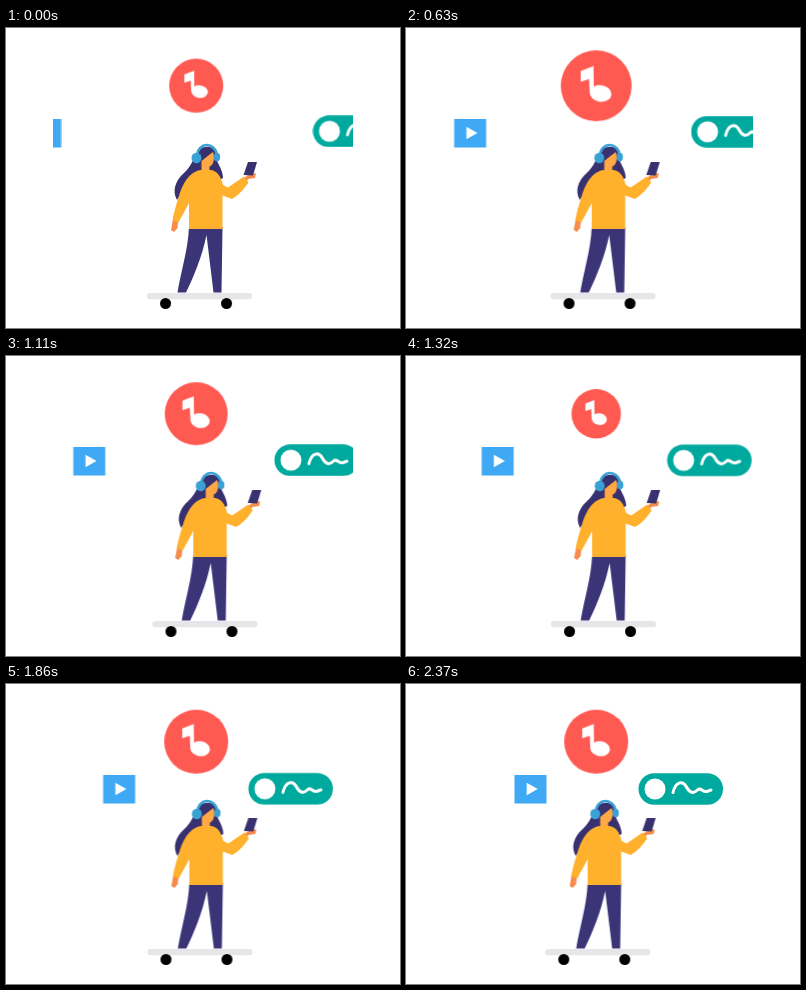
Animation, 394 px wide and 300 px high, one loop 2.67 s. Source, as an HTML page:

```html
<!DOCTYPE html>
<html lang="en">
<head>
<meta charset="utf-8">
<title>Skater with music</title>
<style>
  html, body { margin: 0; width: 100%; height: 100%; overflow: hidden; background: #fff; }
  svg { display: block; width: 100vw; height: 100vh; }
  .slide, .pulse, .sway { animation: 2670ms linear infinite; }
  .slide { animation-name: slide; }
  .pulse { animation-name: pulse; }
  .sway { animation-name: sway; }

  /* steady slide that brakes briefly at the end */
  @keyframes slide {
    0% { transform: translate(var(--x), var(--y)); }
    77.15% {
      transform: translate(calc(var(--x) * .04), calc(var(--y) * .04));
      animation-timing-function: cubic-bezier(.33, .67, .67, 1);
    }
    83.7%, 100% { transform: none; }
  }
  @keyframes pulse {
    0% { transform: scale(.845); animation-timing-function: cubic-bezier(.42, 0, .8, .8); }
    31.8% { transform: scale(1.25); animation-timing-function: cubic-bezier(.3, .1, .7, .9); }
    50% { transform: scale(.766); animation-timing-function: cubic-bezier(.3, .2, .6, 1); }
    61.4%, 100% { transform: scale(1); }
  }
  @keyframes sway {
    0% { transform: none; animation-timing-function: cubic-bezier(.4, .3, .7, .7); }
    38.4% {
      transform: translateX(calc(var(--d) * 6px));
      animation-timing-function: cubic-bezier(.4, .45, .7, .9);
    }
    88.76%, 100% { transform: translateX(calc(var(--d) * -1.7px)); }
  }
</style>
</head>
<body>
<svg viewBox="0 0 394 300">
  <clipPath id="window"><rect x="47" width="300" height="300"/></clipPath>

  <g clip-path="url(#window)">
    <g class="slide" style="--x:-85.5px;--y:0px">
      <path fill="#3fa9f5" d="M108.5 91h32v28.5h-32z"/>
      <path fill="#fff" d="M120.7 98.8l11 6.2-11 6.2z"/>
    </g>
    <g class="slide" style="--x:74.5px;--y:-1.7px">
      <rect x="232.5" y="89.2" width="84.5" height="31.6" rx="15.8" fill="#00a99d"/>
      <circle cx="249" cy="105" r="10.5" fill="#fff"/>
      <path transform="translate(232.5 89)" fill="none" stroke="#fff" stroke-width="3" stroke-linecap="round"
        d="M34.5 19.5C37 9 44 7 48 14C51 20 55 21 59 17C62 14 64 18.500 67 18.500C70 19 71 17 72.500 17"/>
    </g>
  </g>

  <g transform="translate(190.200 57.700)">
    <g class="pulse">
      <circle r="32" fill="#ff5a52"/>
      <path fill="#fff" d="M-14-13.300L-2.500-17.700L-2.200 1L-5.800 8L-6.500-6L-14-3.500z"/>
      <ellipse cx="4" cy="7" rx="9.800" ry="7.500" transform="rotate(8 4 7)" fill="#fff"/>
    </g>
  </g>

  <g class="sway" style="--d:1">
    <rect x="141" y="265" width="105" height="6.300" rx="3.100" fill="#e5e5ea"/>
    <circle cx="159.500" cy="275.500" r="5.500"/>
    <circle cx="220.500" cy="275.500" r="5.500"/>
  </g>

  <g class="sway" style="--d:.78">
    <!-- hair -->
    <path fill="#38316f" d="M194 121C200 117 209 118 210 126C209 134 217 140 217 150L205 156L186 150C182 156 177 163 171 172C166 163 169 153 178 145C186 138 188 128 194 121z"/>
    <!-- trousers -->
    <path fill="#3b3577" d="M183 199H216.500L215.500 264.500H207.500L200.500 207C196 229 188 248 180 264.500H171.500C175 243 182 222 183 199z"/>
    <!-- hands -->
    <path fill="#f68b4c" d="M167 191L172 194L171.500 200L168 204L165 202zM237 151L242 147L250 145L249 150L242 151L240 155z"/>
    <!-- face and neck -->
    <path fill="#ffa845" d="M207 124C209 130 208 137 203.500 138.500L203.500 146H195.500V133C199 130 203 127 207 124z"/>
    <!-- sweater -->
    <path fill="#ffb02c" d="M195.500 142H204.500C212 143 215 149 217 157L222 159.500L238 148.500L242.500 154.500C238 161 233 167 226 171L216.500 167.500V201H183L183 175C180 181 176 188 172.500 194.500L166.500 192C168 184 170 177 173 168C177 155 184 143 195.500 142z"/>
    <path fill="#38316f" d="M242 134H251L247 147.500L237.500 147z"/>
    <!-- headphones -->
    <g fill="#3aa1d5">
      <path fill="none" stroke="#3aa1d5" stroke-width="2.600" d="M191 128C192 113.500 209 113.500 211 127"/>
      <ellipse cx="190.500" cy="130" rx="5" ry="5.300"/>
      <ellipse cx="211" cy="129" rx="3.200" ry="4.300"/>
    </g>
  </g>
</svg>
</body>
</html>
```
